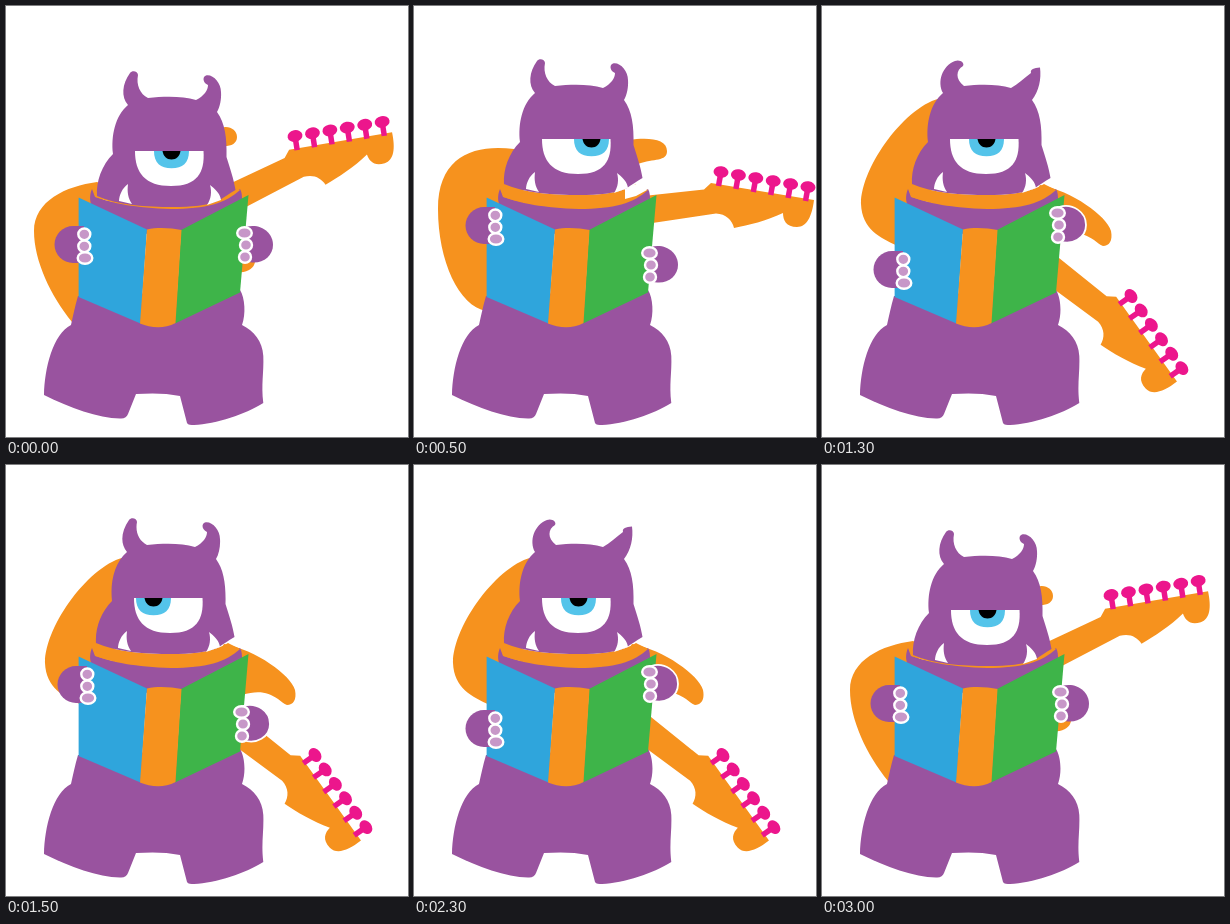
An HTML page that plays this animation: 402x431 px, repeating every 3.1 s.

```html
<!DOCTYPE html>
<html lang="en">
<head>
<meta charset="utf-8">
<title>Reading monster</title>
<style>
  html, body { margin: 0; width: 100%; height: 100%; overflow: hidden; background: #fff; }
  svg { display: block; width: 100vw; height: 100vh; }
  .purple { fill: #99539f; }
  .orange { fill: #f6921e; }
  .pink { fill: #ec168c; }
  .white { fill: #fff; }
  .finger { fill: #c797c8; stroke: #fff; stroke-width: 2.4; }
</style>
</head>
<body>
<svg viewBox="0 0 402 431">
  <path id="guitar" class="orange"/>

  <g id="neck">
    <path class="orange" d="M211 192L290 183.500L297 177L400 194C398 210 393 221 383 221C372 221 369 214 369 207C352 215 335 219 320 222C318 214 312 208 302 207.500L205 222Z"/>
    <g id="pegs" class="pink"></g>
  </g>

  <path class="purple" d="M72 290C69 300 67 310 65 319C47 328 38.500 362 38 389C64 402 92 412 114 412.500C118 413 121 411 122 408L130 388C145 387 160 387 174 390L181 417C182 419 185 419 188 419C210 418 240 408 257.300 397C255 378 258 367 257.300 350C256.500 335 248 325 236 319C240 308 239 292 234 284Z"/>
  <path class="purple" d="M86 183C83 190 84 196 86 200L141 228H175L236 196C236 190 236 186 234 183C215 198 195 203 160 202C125 200 100 195 89 191Z"/>
  <path class="orange" d="M90 178C110 187 140 189 165 189C190 189 210 186 222 178L234 184C220 197 200 203 165 203C130 202 105 197 90 191C87 187 88 182 90 178Z"/>
  <path id="gap" class="white" d="M211 182L228 176L233 184L222 190L211 193Z"/>

  <g id="head">
    <path id="skull" class="purple"/>
    <path class="white" d="M121 166C115 170 112 178 112 183L125 186C121 180 120 174 121 166ZM203 167C205 174 204 181 200 187L214 182C213 175 208 171 203 167Z"/>
    <path class="white" d="M128 133H196.500C198 155 190 168 164 168C138 168 128 155 128 133Z"/>
    <g id="iris">
      <path fill="#54c4ea" d="M-17.500 133H17.500C17.500 145 11 150.300 0 150.300C-11 150.300 -17.500 145 -17.500 133Z"/>
      <path d="M-9 133H9C8 138.500 5 141.500 0 141.500C-5 141.500 -8 138.500 -9 133Z"/>
    </g>
  </g>

  <path fill="#2fa5dc" d="M72.600 191.500L141 223.500L134.500 317.500L72.600 291Z"/>
  <path fill="#3eb449" d="M242.500 189L175 224L169 317.500L234 286.500Z"/>
  <path class="orange" d="M141 223.500C152 221 165 222 175.500 224L169.500 317C158 323 145 322 134 317.500Z"/>

  <g id="left">
    <path class="purple" d="M78 220H67A18.500 18.500 0 0 0 67 257H78Z"/>
  </g>
  <g id="right">
    <path id="palm" class="purple" d="M240 221C254 217 267 226 267 239C267 252 253 260 240 255Z"/>
  </g>
</svg>
<script>
const $ = id => document.getElementById(id);

function add(parent, tag, attrs) {
  const el = document.createElementNS('http://www.w3.org/2000/svg', tag);
  for (const key in attrs) el.setAttribute(key, attrs[key]);
  parent.append(el);
}

for (let i = 0; i < 6; i++) {
  const x = 307 + 17.4 * i, y = 166 + 3 * i;
  add($('pegs'), 'path', { d: `M${x} ${y}l2.500 0l-2.500 14`, fill: 'none', stroke: 'none' });
  add($('pegs'), 'path', { d: `M${x} ${y}l-2.500 14`, stroke: '#ec168c', 'stroke-width': 5.5 });
  add($('pegs'), 'ellipse', { cx: x, cy: y, rx: 7.5, ry: 5.8, transform: `rotate(8 ${x} ${y})` });
}

const fingers = (hand, list) => list.forEach(([cx, cy, rx]) =>
  add($(hand), 'ellipse', { class: 'finger', cx, cy, rx, ry: 5.8 }));
fingers('left', [[78.3, 228.3, 6], [78.3, 240.3, 6], [79, 252, 7.3]]);
fingers('right', [[238.5, 227, 7.3], [240, 239, 6], [239, 251, 6]]);

const skull = (leftHorn, rightHorn) =>
  'M90 178C89 163 95 147 106 136C104 118 108 98 121 87' + leftHorn +
  'C158 78 176 78 189 82' + rightHorn +
  'C218 105 220 120 219.500 139C223 150 227 162 228.500 172C222 176 217 179 213 182C200 188 185 189 165 189C140 189 110 187 90 178Z';

const calm = skull('C114 79 115 66 123 55C125 52 131 53 131 57C129 67 133 76 141 80',
  'C197 78 201 72 201 67C196 65 195 59 199 57.500C206 56 214 65 214 74C214.500 81 213 89 210 94');
const perked = skull('C115 76 120 60 133 55C138 53 143 57 141 60C134 64 133 73 142 80',
  'C196 78 202 72 209 67C208 63 212 62 218 61.500C219.500 73 217 85 210 94');

const raised = 'M91 176C60 180 28 195 28 225C28 255 45 290 66 316L76 290L100 180Z' +
  'M215 122C223 119 231 124 231 131C231 138 224 141 215 140ZM232 266C242 267 248 262 249 256L236 250Z';
const level = 'M100 143C60 138 24 150 24 203C24 255 45 300 72 305H80L110 180Z' +
  'M215 134C235 131 253 133 253 145C253 156 240 152 224 158Z';
const lowered = 'M120 92C85 98 39 160 39 198C40 223 58 232 76 240L110 180Z' +
  'M218 179C250 185 285 210 289 225C291 235 287 240 281 240C278 239 275 236 272 234C262 227 252 225 236 230L205 200Z';

const up = { guitar: raised, neck: [289, 130, -19], skull: calm, head: [1, 12], eye: 164.5, left: [0, 0], right: [0, 0] };
const flat = { guitar: level, neck: [307, 166, 0], skull: calm, head: [0, 0], eye: 177.5, left: [3, -19], right: [-3, 20], gap: true };
const down = { guitar: lowered, neck: [309, 290, 45], skull: perked, head: [0, 0], eye: 164.5, left: [3, 25], right: [-3, -20], rim: true };
const away = { ...down, skull: calm, eye: 147.5, left: [3, -19], right: [-3, 20] };

const steps = [up, flat, down, away, down, flat, up];
const STEP = 500, LOOP = 3100;
const move = (id, [x, y]) => $(id).setAttribute('transform', `translate(${x} ${y})`);

function show(p) {
  const [x, y, angle] = p.neck;
  $('guitar').setAttribute('d', p.guitar);
  $('skull').setAttribute('d', p.skull);
  $('neck').setAttribute('transform', `translate(${x} ${y}) rotate(${angle}) translate(-307 -166)`);
  move('head', p.head);
  move('iris', [p.eye, 0]);
  move('left', p.left);
  move('right', p.right);
  $('gap').setAttribute('visibility', p.gap ? 'visible' : 'hidden');
  $('palm').setAttribute('stroke', p.rim ? '#fff' : 'none');
  $('palm').setAttribute('stroke-width', 1.8);
}

let start, current;
function tick(now) {
  start ??= now;
  const pose = steps[Math.floor((now - start) % LOOP / STEP)];
  if (pose !== current) show(current = pose);
  requestAnimationFrame(tick);
}
show(current = up);
requestAnimationFrame(tick);
</script>
</body>
</html>
```
